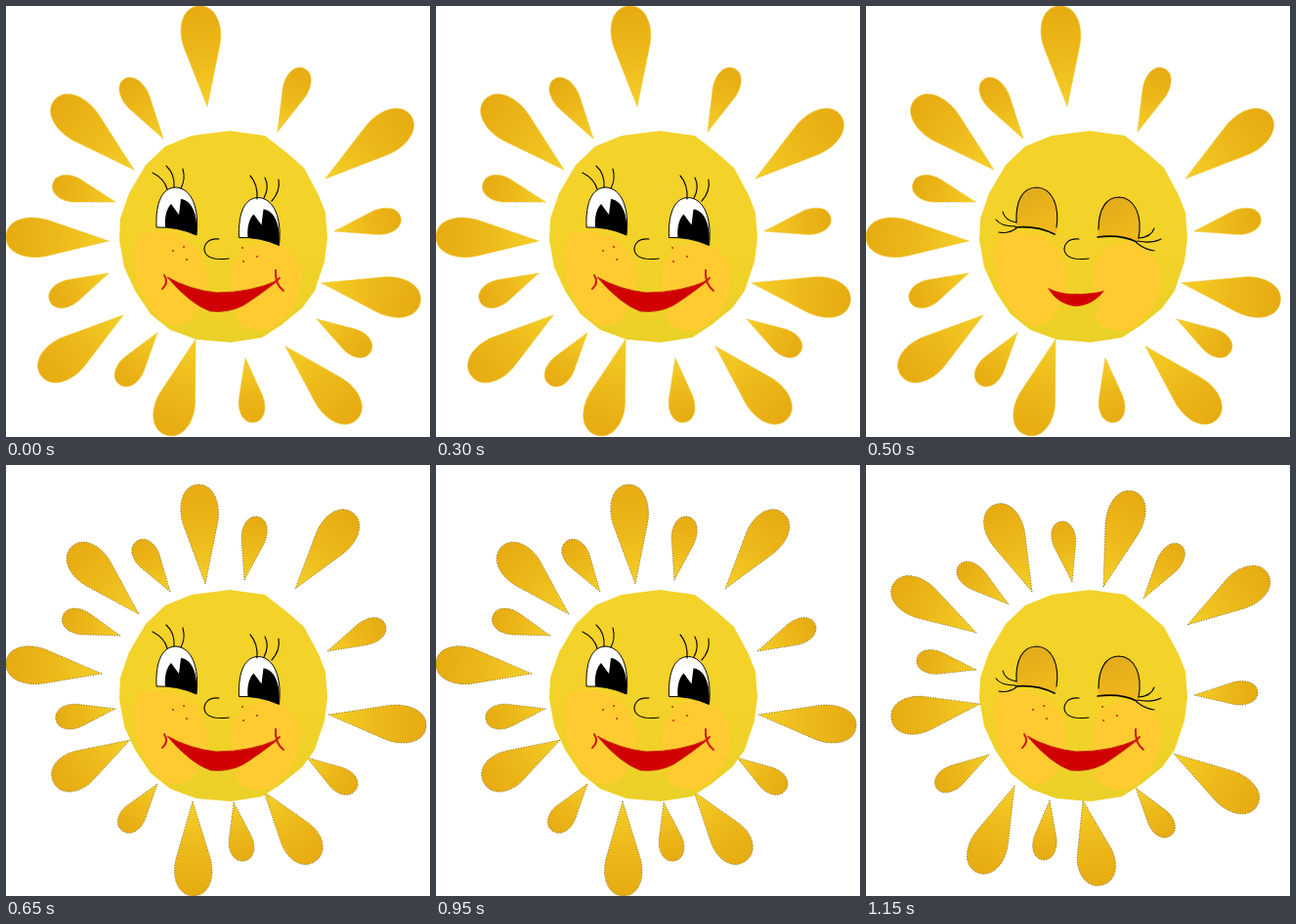
An HTML page for the animation above (1.3 s loop, 434 px wide and 442 px high).

```html
<!DOCTYPE html>
<html lang="en">
<head>
<meta charset="utf-8">
<title>Blinking sun</title>
<style>
  html, body { margin: 0; width: 100%; height: 100%; overflow: hidden; background: #fff; }
  svg { display: block; width: 434px; height: 442px; }
  .line { fill: none; stroke: #080600; stroke-width: 1.15; stroke-linecap: round; }
  .ray { fill: url(#gold); stroke: #f1c21b; stroke-width: 1; stroke-dasharray: 1 1; vector-effect: non-scaling-stroke; }
  .dark .ray { stroke: #665315; stroke-width: .8; stroke-dasharray: 1 1.7; }
</style>
</head>
<body>
<svg viewBox="0 0 434 442">
  <defs>
    <linearGradient id="gold">
      <stop offset="0" stop-color="#f5cf28"/>
      <stop offset=".5" stop-color="#edb91a"/>
      <stop offset="1" stop-color="#e6ab12"/>
    </linearGradient>
    <linearGradient id="lid" x2=".4" y2="1">
      <stop offset="0" stop-color="#dfa81a"/>
      <stop offset="1" stop-color="#f0b91c"/>
    </linearGradient>
    <linearGradient id="skin" x2="0" y2="1">
      <stop offset=".55" stop-color="#f3d229"/>
      <stop offset="1" stop-color="#ead027"/>
    </linearGradient>
    <g id="eye">
      <path d="M154 227C153 201 160 186 174 186C190 187 198 207 195 235Q175 226 154 227Z" fill="#fff" stroke="#080600"/>
      <path d="M163 227C162 215 165 207 169 203L177 214L179 198C190 199 197 214 195 235Q180 228 163 227Z"/>
    </g>
    <path id="closed" d="M154 227C152 200 160 186 175 186C192 187 199 207 195 233Q177 225 154 227Z" fill="url(#lid)"/>
  </defs>

  <g id="rays"></g>

  <path fill="url(#skin)" d="M190 133L229 128L265 133L288 151L305 166L320 194L327 212L329 238L326 262L316 292L303 310L282 327L262 340L230 345L195 342L168 332L148 316L132 292L121 268L116 240L117 218L126 192L143 163L163 144Z"/>
  <g fill="#ffcb30">
    <path d="M137 233Q160 229 181 237L198 251L207 277L202 302L190 321Q174 335 155 319L143 304L133 280L130 252Z"/>
    <path d="M245 248L267 240L288 249L303 269L300 293L292 312L276 329Q258 337 241 328L234 319L241 304L231 290L232 266Z"/>
  </g>

  <g id="open">
    <use href="#eye"/>
    <use href="#eye" x="84.5" y="10.5"/>
    <path class="line" d="M165 188Q162 177 150 171M172 186Q173 172 164 164M179 187Q184 178 181 167M257 198Q258 183 250 174M264 197Q270 186 265 176M272 200Q281 190 279 178"/>
  </g>

  <g id="shut">
    <use href="#closed"/>
    <use href="#closed" x="84" y="10"/>
    <path class="line" d="M154 222C153 200 160 186 175 186C192 187 198 207 195 227M238 229C238 208 246 196 259 196C276 197 283 216 279 238"/>
    <path class="line" stroke-width="1.6" style="stroke-width:1.7" d="M153 227Q175 225 193 234M237 237Q261 234 277 242"/>
    <path class="line" d="M154 222Q142 220 140 211M153 226Q138 226 133 219M154 228Q145 234 136 232M279 238Q292 237 295 228M278 241Q292 244 302 239M277 243Q286 250 295 251"/>
  </g>

  <path class="line" d="M218 239C207 238 203 244 203 250C204 257 211 261 228 259"/>

  <g id="smile">
    <path fill="#d10000" stroke="#c72a0b" d="M165 278Q188 291 215 294Q251 294 279 281Q259 297 243 307Q228 315 209 313Q189 306 165 278Z"/>
    <path fill="none" stroke="#cf1d10" stroke-width="2" stroke-linecap="round" d="M162 276Q167 284 160 290M276 271Q275 285 284 292M274 284L280 279"/>
    <path stroke="#c9410c" stroke-width="2.2" stroke-linecap="round" d="M171 251h.1M182 247h.1M185 260h.1M242 248h.1M257 257h.1M243 262h.1"/>
  </g>
  <path id="lips" fill="#d10000" d="M186 289Q200 296 215 295Q230 296 244 292Q231 308 214 308Q196 306 186 289Z"/>
</svg>

<script>
// Each ray: tip x, tip y, end x, end y. Large and small rays alternate.
const straight = [
  [206,103,197,0], [278,129,305,64], [327,177,414,112], [336,231,404,217],
  [323,284,424,304], [318,321,373,355], [286,349,359,424], [245,361,254,427],
  [194,342,164,440], [155,335,116,388], [120,317,36,379], [105,274,45,303],
  [105,241,0,236], [112,201,48,182], [131,168,50,96], [161,136,121,75]
];
const tilted = [
  [204,122,196,20], [244,118,258,53], [296,127,355,49], [329,191,388,163],
  [330,256,430,269], [308,300,358,333], [264,335,317,406], [233,346,244,406],
  [191,345,192,442], [155,327,119,375], [127,282,49,326], [112,250,51,261],
  [98,214,0,202], [117,175,58,155], [136,153,67,84], [168,130,134,78]
];
const turned = [
  [170,130,131,41], [211,120,199,58], [243,125,274,27], [284,137,322,82],
  [329,164,411,111], [336,236,401,233], [315,296,400,350], [276,331,312,380],
  [222,344,241,431], [188,344,181,405], [152,329,114,418], [126,297,72,331],
  [117,245,26,261], [113,210,52,199], [113,172,28,122], [146,143,95,103]
];

const byId = id => document.getElementById(id);
const teardrop = "M0 0L.6-.46C.8-.6 1-.42 1 0C1 .42 .8 .6 .6 .46Z";

function rayPath([x, y, endX, endY], index, widths) {
  const length = Math.hypot(endX - x, endY - y);
  const angle = Math.atan2(endY - y, endX - x) * 180 / Math.PI;
  return `<path class="ray" d="${teardrop}" transform="translate(${x} ${y}) rotate(${angle}) scale(${length} ${widths[index % 2]})"/>`;
}

function addRays(rays, widths, style) {
  const group = document.createElementNS("http://www.w3.org/2000/svg", "g");
  group.setAttribute("class", style);
  group.innerHTML = rays.map((ray, i) => rayPath(ray, i, widths)).join("");
  byId("rays").append(group);
  return group;
}

const rings = [
  addRays(straight, [40, 26], ""),
  addRays(tilted, [38, 25], "dark"),
  addRays(turned, [38, 24], "dark")
];

const poses = [
  { until: 500, ring: 0, awake: true, smiling: true },
  { until: 650, ring: 0, awake: false, smiling: false },
  { until: 1150, ring: 1, awake: true, smiling: true },
  { until: 1300, ring: 2, awake: false, smiling: true }
];

const show = (element, visible) => { element.style.display = visible ? "" : "none"; };

function draw(now) {
  const time = now % 1300;
  const pose = poses.find(p => time < p.until);
  rings.forEach((ring, i) => show(ring, i === pose.ring));
  show(byId("open"), pose.awake);
  show(byId("shut"), !pose.awake);
  show(byId("smile"), pose.smiling);
  show(byId("lips"), !pose.smiling);
}

const start = performance.now();
function tick() {
  draw(performance.now() - start);
  requestAnimationFrame(tick);
}
tick();
</script>
</body>
</html>
```
